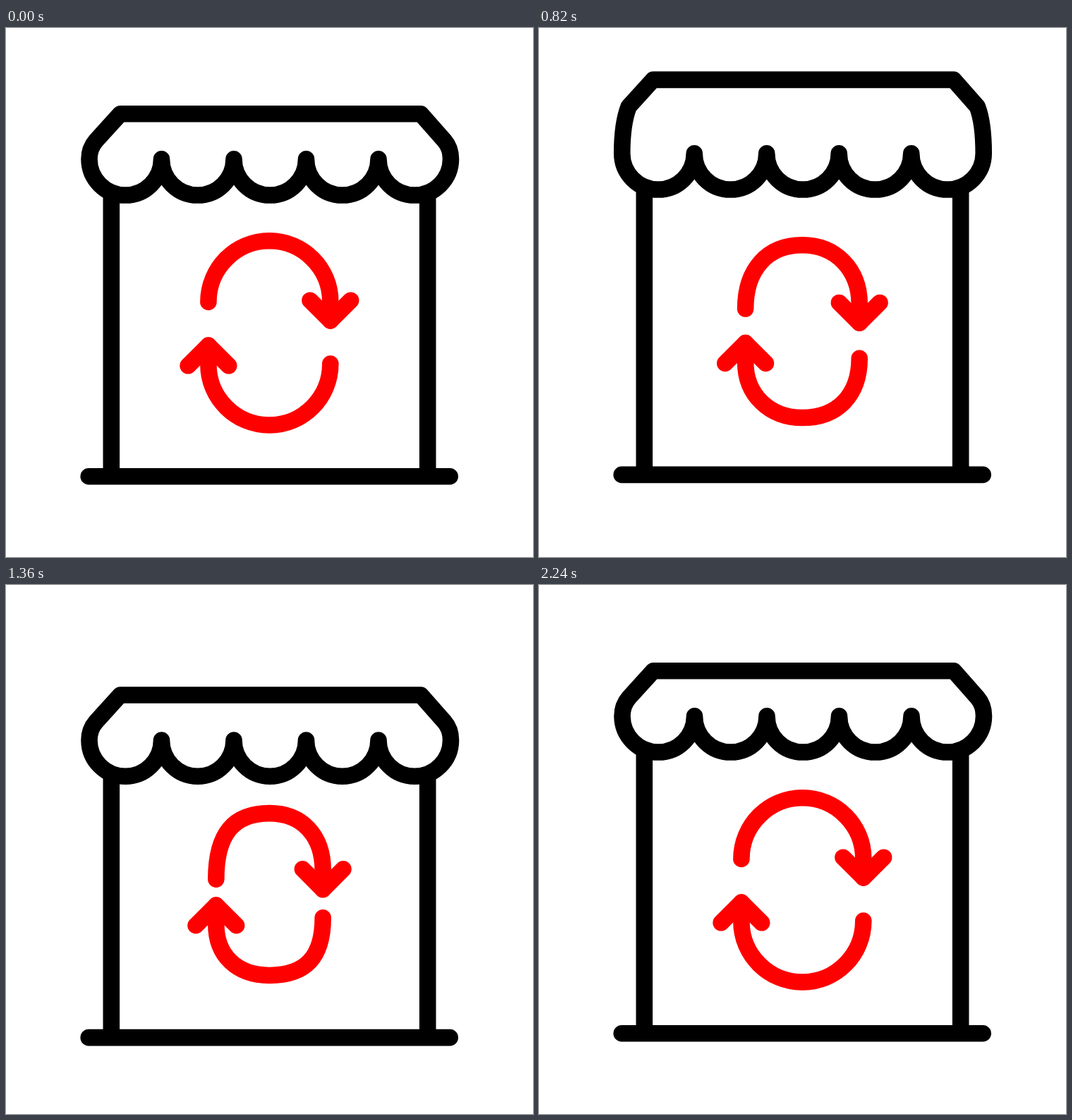
An HTML page with a canvas for the animation above (2.54 s loop, 747 by 750 pixels).

```html
<!DOCTYPE html>
<html lang="en">
<head>
<meta charset="utf-8">
<title>Shop</title>
<style>
  html, body { margin: 0; width: 100%; height: 100%; overflow: hidden; background: #fff; }
  canvas { display: block; }
</style>
</head>
<body>
<canvas id="stage" width="747" height="750"></canvas>
<script>
const ctx = document.getElementById('stage').getContext('2d');
const LOOP = 2540, STEP = 20, HALF = 350;
const RED = '#f00', BLACK = '#000';
const ROUND = 0.5523;

const mix = (a, b, p) => a + (b - a) * p;

// Smooth 0..1 ramp between two times.
function ramp(t, from, to) {
  const s = Math.min(1, Math.max(0, (t - from) / (to - from)));
  return s * s * (3 - 2 * s);
}

// Press down to low, leap to high, land at low again, settle at 0.
function bounce(t, low, high, lag, begin = 240) {
  const leap = 550 + lag, apex = leap + HALF;
  const air = ramp(t, leap, apex) - ramp(t, apex, apex + HALF);
  const press = ramp(t, begin, begin + 280) - ramp(t, 1310, 1640);
  return low * press + (high - low) * air;
}

function poly(...p) {
  const path = new Path2D();
  for (let i = 0; i < p.length; i += 2) path.lineTo(p[i], p[i + 1]);
  return path;
}

function stroke(path, color) {
  ctx.strokeStyle = color;
  ctx.stroke(path);
}

function strokePart(path, length, from, to, color) {
  if (to - from < 0.001) return;
  ctx.setLineDash([(to - from) * length, length * 3]);
  ctx.lineDashOffset = -from * length;
  stroke(path, color);
  ctx.setLineDash([]);
}

function drawShop(t, base) {
  const roof = bounce(t, 36.5, -62, 2);
  const scallop = bounce(t, 36.5, -19, 20);
  const sway = -1.2 * (ramp(t, 240, 450) - ramp(t, 640, 900));
  const stretch = scallop - roof;
  const baseY = 635.75 + base, topY = 121.7 + roof, tipY = 185.8 + scallop;
  const mid = 374.25, r = 51.25, wide = 5 * r;

  for (const side of [-1, 1]) {
    const x = 373.5 + side * 224.2;
    stroke(poly(x, tipY + 52, x, baseY - 2), BLACK);
  }
  stroke(poly(117.2, baseY, 629.2, baseY), BLACK);

  const awning = new Path2D();
  const shoulder = topY + 38;
  const bend1 = shoulder + 6.5 + stretch * 0.2;
  const bend2 = tipY - 10 - stretch * 0.5;
  awning.moveTo(mid - wide, tipY);
  awning.bezierCurveTo(mid - wide, bend2, 121.8, bend1, 127.5, shoulder);
  awning.lineTo(162, topY);
  awning.lineTo(588, topY);
  awning.lineTo(621.5, shoulder);
  awning.bezierCurveTo(627.2, bend1, mid + wide, bend2, mid + wide, tipY);
  for (let i = 2; i >= -2; i--) awning.arc(mid + i * r * 2, tipY, r, 0, Math.PI);
  awning.closePath();
  ctx.save();
  ctx.translate(sway, 0);
  stroke(awning, BLACK);
  ctx.restore();
}

// Two quarter turns and a straight run to the tip; squash makes them boxier.
function arch(x0, y0, topX, topY, x1, y1, tipY, squash) {
  const k0 = ROUND + 0.13 * squash, k1 = ROUND + 0.06 * squash;
  const path = new Path2D();
  path.moveTo(x0, y0);
  path.bezierCurveTo(x0, mix(y0, topY, k0), mix(topX, x0, k0), topY, topX, topY);
  path.bezierCurveTo(mix(topX, x1, k1), topY, x1, mix(y1, topY, k1), x1, y1);
  path.lineTo(x1, tipY);
  return path;
}

function drawArrows(t, y) {
  const q = bounce(t, 1.03, 0.31, 40);
  const inkStart = ramp(t, 1750, 2240), inkEnd = ramp(t, 1540, 1940);
  const left = 286.9 + 11.3 * q, right = 459.8 - 11 * q, mid = 373.4;
  const tip1 = 415 + y + 11 * q, tip2 = 450 + y - 2 * q;
  const head = (x, tip, d) => poly(x - d, tip - d, x, tip, x + d, tip - d);
  const parts = [
    [arch(left, 388.5 + y + 23.5 * q, mid, 301.8 + y + 16.5 * q, right, tip1 - 27, tip1, q), 298],
    [arch(right, 476 + y - 10.5 * q, mid, 563 + y - 16 * q, left, tip2 + 27, tip2, q), 298],
    [head(right, tip1, 28.8), 81.5],
    [head(left, tip2, -28.8), 81.5]
  ];
  for (const [path] of parts) stroke(path, RED);
  for (const [path, length] of parts) strokePart(path, length, inkStart, inkEnd, BLACK);
}

// Three rays on the right, repeated on the left by a half turn.
function drawSparks(t) {
  const from = 49 * ramp(t, 1040, 1220), to = 49 * ramp(t, 860, 1040);
  if (to - from < 0.05) return;
  for (const side of [-1, 1]) {
    for (let i = -1; i <= 1; i++) {
      const angle = (i * 34 - i * i * 6 + 1) * Math.PI / 180;
      const at = d => [
        376 + side * (154 + d * Math.cos(angle)),
        422 + side * (3 + 61 * i + d * Math.sin(angle))
      ];
      stroke(poly(...at(from), ...at(to)), RED);
    }
  }
}

function draw(t) {
  const base = bounce(t, 6.3, -9, 80, 320);
  ctx.fillStyle = '#fff';
  ctx.fillRect(0, 0, 747, 750);
  ctx.lineWidth = 23.6;
  ctx.lineCap = ctx.lineJoin = 'round';
  drawShop(t, base);
  drawArrows(t, base);
  drawSparks(t);
}

const start = performance.now();
function tick(now) {
  const t = Math.max(0, now - start) % LOOP;
  draw(Math.floor(t / STEP) * STEP);
  requestAnimationFrame(tick);
}
draw(0);
requestAnimationFrame(tick);
</script>
</body>
</html>
```
